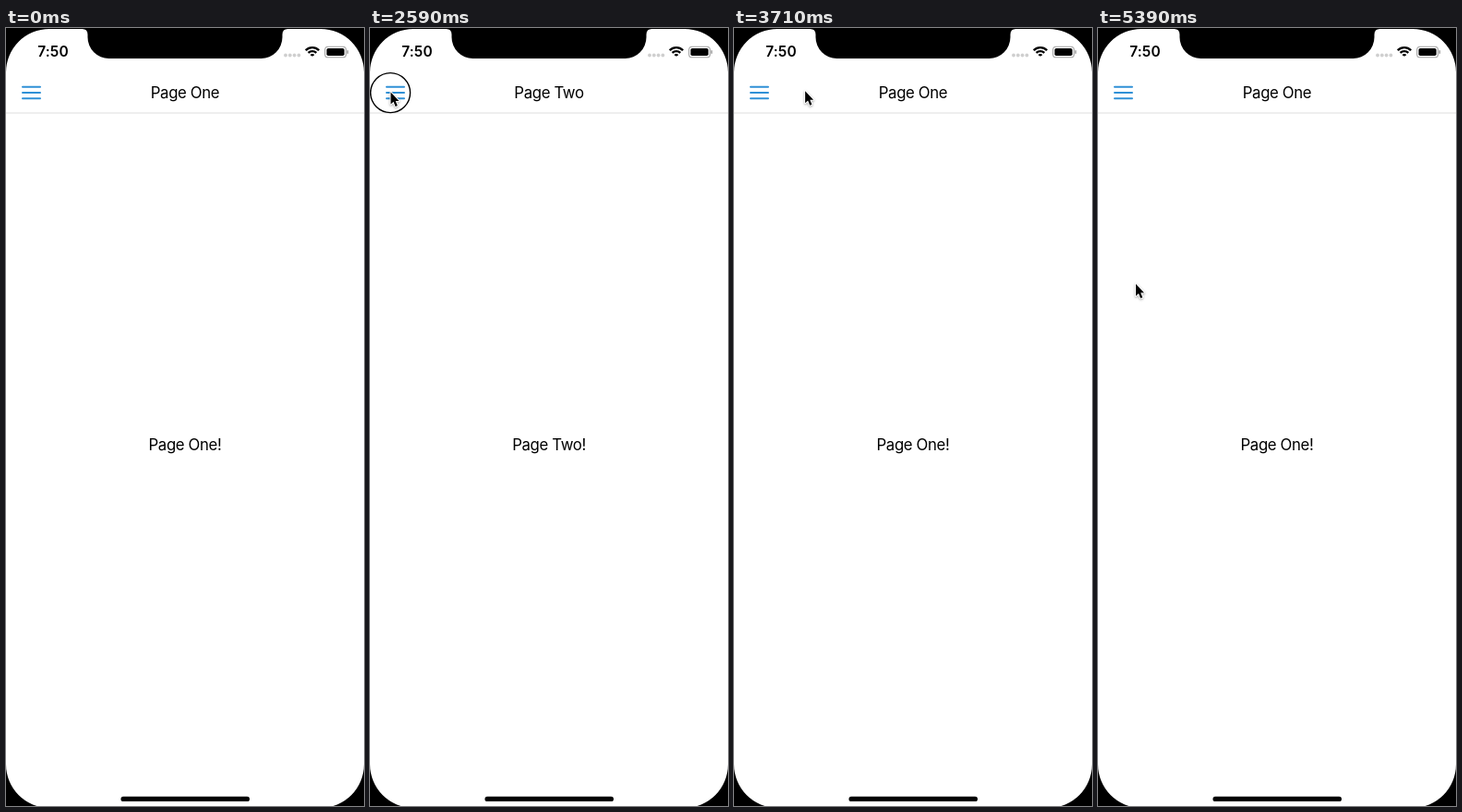
An HTML page with a canvas for the animation above (5.46 s loop, 388x842 px).

```html
<!DOCTYPE html>
<html lang="en">
<head>
<meta charset="utf-8">
<title>Drawer menu</title>
<style>
  html, body { margin: 0; width: 100%; height: 100%; overflow: hidden; background: #000; }
  canvas { display: block; width: 388px; height: 842px; }
</style>
</head>
<body>
<canvas id="stage"></canvas>
<script>
const W = 388, H = 842, LOOP = 5460, TICK = 70, OPEN = 256;
const HOLD = 140, SLIDE = 205;
const BLUE = '#348acf', ICON = '#0d8cf0', ROW = '#5a9eff', BAR = '#2f90d6';
const FONT = 'Inter, "Liberation Sans", sans-serif';
const LABELS = ['Page One', 'Page Two'];

const canvas = document.getElementById('stage');
const ctx = canvas.getContext('2d');
const dpr = window.devicePixelRatio || 1;
canvas.width = W * dpr;
canvas.height = H * dpr;

// The pointer glides to each spot, arriving at `at`; a tap there opens the menu or picks a page.
const entry = { x: 340, y: 772 };
const steps = [
  { at: 280, glide: 140, x: 63, y: 84 },
  { at: 770, glide: 350, x: 25, y: 70, tap: 'menu' },
  { at: 1540, glide: 420, x: 102, y: 103.5, tap: 'page', page: 1 },
  { at: 2590, glide: 630, x: 22.5, y: 69.5, tap: 'menu' },
  { at: 3360, glide: 600, x: 106, y: 72, tap: 'page', page: 0 },
  { at: 4060, glide: 560, x: 29, y: 62, tap: 'menu' },
  { at: 4690, glide: 210, x: 162, y: 263 },
  { at: 4970, glide: 210, x: 38, y: 277, drag: true },
  { at: 5390, glide: 70, x: 41, y: 277 }
];
steps.forEach((s, i) => {
  s.from = steps[i - 1] || entry;
  s.start = s.at - s.glide;
  s.down = s.drag ? s.start : s.at;
  s.up = s.at + (s.drag ? TICK : HOLD);
});

const within = (t, a, b) => t >= a && t < b;
const mix = (a, b, p) => a + (b - a) * p;
const easeOut = p => 1 - (1 - p) ** 3;

function stateAt(t) {
  const state = { pointer: null, pressed: false, page: 0, active: -1, edge: 0, dim: 0 };

  const slide = (from, to, start) => {
    if (t < start) return;
    state.edge = mix(from, to, easeOut(Math.min(1, (t - start) / SLIDE)));
    state.dim = to ? 1 : 0;
  };

  for (const s of steps) {
    if (t < s.start) break;
    const p = Math.min(1, (t - s.start) / s.glide);
    state.pointer = { x: mix(s.from.x, s.x, p), y: mix(s.from.y, s.y, p) };

    if (s.tap || s.drag) state.pressed = within(t, s.down, s.up);
    if (s.tap === 'menu') slide(0, OPEN, s.up - TICK);
    if (s.tap === 'page') {
      slide(OPEN, 0, s.up - 15);
      if (t >= s.up) state.page = s.page;
      if (within(t, s.down + TICK, s.up + SLIDE)) state.active = s.page;
    }
    if (s.drag) {
      state.edge = OPEN - (s.from.x - state.pointer.x);
      state.dim = state.edge / OPEN;
      slide(state.edge, 0, s.at - 15);
    }
  }
  return state;
}

function text(str, x, y, { size = 16.8, weight = 400, color = '#000', align = 'center', spacing = -0.37 } = {}) {
  ctx.font = `${weight} ${size}px ${FONT}`;
  ctx.letterSpacing = spacing + 'px';
  ctx.textAlign = align;
  ctx.fillStyle = color;
  ctx.fillText(str, x, y);
}

function rect(x, y, w, h, color, r = 0) {
  ctx.fillStyle = color;
  ctx.beginPath();
  ctx.roundRect(x, y, w, h, r);
  ctx.fill();
}

function poly(...points) {
  ctx.beginPath();
  points.forEach(p => ctx.lineTo(...p));
}

function drawPage(name) {
  rect(0, 0, W, H, '#fff');
  rect(0, 91.5, W, 1, '#dedede');
  for (let i = -1; i <= 1; i++) rect(17, 69 + i * 6.3, 21, 2, BAR, 1);
  text(name, 194, 76.2);
  text(name + '!', 194, 457.4);
}

function drawHouse(color) {
  ctx.fillStyle = ctx.strokeStyle = color;
  ctx.lineWidth = 1.9;
  ctx.lineCap = ctx.lineJoin = 'round';
  poly([-9.2, 0.6], [0, -8.6], [9.2, 0.6]);
  ctx.stroke();
  ctx.fillRect(5, -8.8, 2.4, 5);
  poly([-7, 1.4], [0, -5.4], [7, 1.4], [7, 9.7], [-7, 9.7]);
  ctx.closePath();
  ctx.rect(-2.3, 1.6, 4.6, 7);
  ctx.fill('evenodd');
}

function drawGear(color) {
  ctx.strokeStyle = ctx.fillStyle = color;
  ctx.lineWidth = 4;
  ctx.beginPath();
  ctx.arc(0, 0, 5.7, 0, Math.PI * 2);
  ctx.stroke();
  for (let i = 0; i < 8; i++) {
    ctx.rotate(Math.PI / 4);
    ctx.beginPath();
    ctx.roundRect(6.5, -1.9, 3.8, 3.8, 0.8);
    ctx.fill();
  }
}

function drawDrawer(edge, dim, active) {
  if (dim > 0) rect(edge, 0, W - edge, H, `rgba(0,0,0,${0.43 * dim})`);
  ctx.save();
  ctx.beginPath();
  ctx.rect(0, 0, edge, H);
  ctx.clip();
  rect(0, 0, OPEN, H, '#fff');
  LABELS.forEach((label, i) => {
    const y = 72 + i * 50, on = active === i;
    if (on) rect(0, y - 21, OPEN, 42, ROW);
    ctx.save();
    ctx.translate(87, y);
    (i ? drawGear : drawHouse)(on ? '#fff' : ICON);
    ctx.restore();
    text(label, 104.5, y + 6.2, { color: on ? '#fff' : BLUE, align: 'left' });
  });
  ctx.restore();
}

function drawStatus() {
  text('7:50', 51, 31.3, { size: 15.5, weight: 600, spacing: 0.1 });
  for (let i = 0; i < 4; i++) rect(301.1 + i * 4.8, 27.6, 3.8, 3.8, 'rgba(0,0,0,0.19)', 1.9);

  ctx.strokeStyle = '#000';
  ctx.lineCap = 'butt';
  ctx.lineWidth = 2.4;
  for (let i = 0; i < 3; i++) {
    ctx.beginPath();
    ctx.arc(332, 31.3, 2.2 + i * 4, -Math.PI * 0.75, -Math.PI * 0.25);
    ctx.stroke();
  }

  ctx.strokeStyle = 'rgba(0,0,0,0.36)';
  ctx.lineWidth = 1.1;
  ctx.beginPath();
  ctx.roundRect(345.7, 20.2, 22.8, 11.6, 3.4);
  ctx.stroke();
  rect(347.5, 22, 19.2, 8, '#000', 1.8);
  rect(369.6, 24, 1.4, 4, 'rgba(0,0,0,0.4)', 0.7);
}

function drawBezel() {
  ctx.fillStyle = '#000';
  ctx.beginPath();
  ctx.rect(0, 0, W, H);
  ctx.roundRect(0, 1, W, 843, 47);
  ctx.fill('evenodd');

  const left = 88.5, right = 299.5, flare = 6;
  ctx.beginPath();
  ctx.moveTo(left - flare, 1);
  ctx.quadraticCurveTo(left, 1, left, 1 + flare);
  ctx.arcTo(left, 33, left + 23, 33, 23);
  ctx.arcTo(right, 33, right, 1 + flare, 23);
  ctx.lineTo(right, 1 + flare);
  ctx.quadraticCurveTo(right, 1, right + flare, 1);
  ctx.fill();
  rect(124.5, 831.8, 139.5, 5.2, '#000', 2.6);
}

function drawPointer({ x, y }, pressed) {
  ctx.save();
  ctx.translate(x, y);
  if (pressed) {
    ctx.strokeStyle = '#000';
    ctx.lineWidth = 1.4;
    ctx.beginPath();
    ctx.arc(-0.4, 0.6, 21.5, 0, Math.PI * 2);
    ctx.stroke();
  }
  poly([0, 0], [0, 13], [3, 10.3], [5.1, 15.4], [7.3, 14.5], [5.2, 9.5], [9, 9.4]);
  ctx.closePath();
  ctx.lineJoin = 'round';
  ctx.lineWidth = 2;
  ctx.strokeStyle = '#fff';
  ctx.shadowColor = 'rgba(0,0,0,0.35)';
  ctx.shadowBlur = 2.5 * dpr;
  ctx.shadowOffsetY = dpr;
  ctx.stroke();
  ctx.shadowColor = 'transparent';
  ctx.fillStyle = '#000';
  ctx.fill();
  ctx.restore();
}

function draw(now) {
  const t = Math.floor((now % LOOP) / TICK) * TICK;
  const { pointer, pressed, page, active, edge, dim } = stateAt(t);
  ctx.setTransform(dpr, 0, 0, dpr, 0, 0);
  drawPage(LABELS[page]);
  if (edge > 0) drawDrawer(edge, dim, active);
  drawStatus();
  drawBezel();
  if (pointer) drawPointer(pointer, pressed);
}

const begin = performance.now();
function loop() {
  draw(performance.now() - begin);
  requestAnimationFrame(loop);
}
loop();
</script>
</body>
</html>
```
